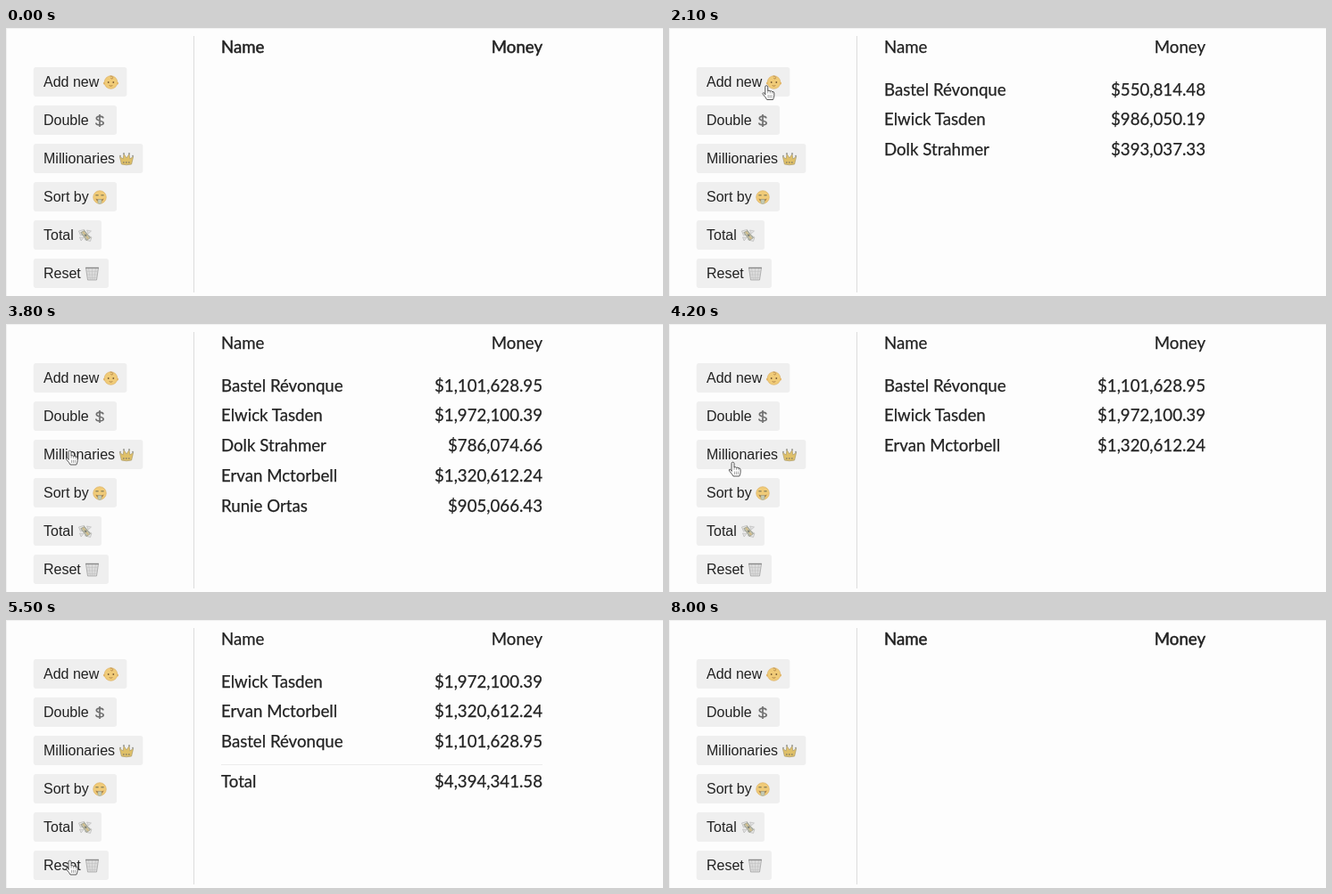
Animation, 736 px wide and 301 px high, one loop 9100 ms. Source, as an HTML page:

```html
<!DOCTYPE html>
<html lang="en">
<head>
<meta charset="utf-8">
<title>Money list</title>
<style>
html, body { margin: 0; width: 100%; height: 100%; overflow: hidden; background: #fdfdfd; }
svg { display: block; width: 736px; height: 301px; }
.btn text { font: 16px "Liberation Sans", Arial, sans-serif; fill: #222; }
.list text { font: 18.65px Lato, sans-serif; fill: #222; stroke: #222; stroke-width: .25; }
.list .strong { stroke-width: .5; }
.end { text-anchor: end; }
</style>
</head>
<body>
<svg viewBox="0 0 736 301">
  <rect width="736" height="301" fill="#fdfdfd"/>
  <path d="M0 .5H736M.5 0V301" stroke="#f1f1f1"/>
  <path d="M210.5 9V297" stroke="#dcdcdc"/>
  <g id="buttons"></g>
  <g class="list">
    <g id="head"><text x="241" y="27.7">Name</text><text class="end" x="601" y="27.7">Money</text></g>
    <g id="rows"></g>
  </g>
  <g id="cursor">
    <path id="arrow" d="M0 0V13L3 10.3L5 15L7.3 14L5.3 9.4H9.3Z" fill="#222" stroke="#fff" stroke-width=".8"/>
    <g id="hand" stroke="#444" stroke-width=".9" stroke-linejoin="round" stroke-linecap="round">
      <path fill="#fff" d="M-1.7 9.5V1.2Q-1.7-.3-.3-.3T1.2 1.2V5.5Q2.5 4.6 3.8 5.9Q5.2 5.2 6.2 6.5Q8 6 8.3 8V11Q8 13.5 7 15.5H.2Q-1 13-4 9.8Q-5.2 8-3.8 7.6Q-2.8 7.5-1.7 9.5Z"/>
      <path fill="none" stroke-width=".5" d="M1.2 5.5V8M3.8 6V8.2M6.2 6.6V8.4M1.6 10.5V13.2M3.6 10.5V13.2M5.6 10.5V13.2"/>
    </g>
  </g>
</svg>
<script>
const LOOP = 9100, STEP = 100;
const $ = id => document.getElementById(id);

// Icons are centred on their own origin.
const face = '<circle r="7.3" fill="#f0cb78" stroke="#d8ae62" stroke-width=".6"/>';
const icons = {
  baby: `<circle cx="-7" cy="1" r="1.6" fill="#e6b768"/><circle cx="7" cy="1" r="1.6" fill="#e6b768"/>${face}
    <path d="M-1-7Q3-7 2-4.4Q0-3 0-5" fill="none" stroke="#b98d4e" stroke-width=".9"/>
    <circle cx="-2.8" cy="0" r=".9" fill="#7a5c34"/><circle cx="2.8" cy="0" r=".9" fill="#7a5c34"/>
    <path d="M-1.8 3.6Q0 4.8 1.8 3.6" fill="none" stroke="#a87b42" stroke-width=".9"/>`,
  dollar: `<path d="M4-2.6C3.6-5.5-3.7-5.7-3.7-2.5S4.2-.2 4.2 2.7S-4 5.8-4.2 2.5M0-7V7" fill="none" stroke="#707070" stroke-width="1.7"/>`,
  crown: `<path d="M-5.6 6L-7.6-2.6L-3.8 0L-3-5.4L0-1L3-5.4L3.8 0L7.6-2.6L5.6 6Q0 7.6-5.6 6Z" fill="#dfc068" stroke="#a99a6c" stroke-width=".7"/>
    <g fill="#a3a39c"><circle cx="-7" cy="-3.2" r="1.1"/><circle cx="-3" cy="-5.8" r="1.1"/><circle cx="3" cy="-5.8" r="1.1"/><circle cx="7" cy="-3.2" r="1.1"/></g>
    <path d="M-4 4H4" stroke="#8d8265" stroke-width="1.3" stroke-dasharray="1.6 1.4"/>`,
  rich: `${face}<path d="M-4.6-2.2H-1.4M1.4-2.2H4.6" stroke="#94885c" stroke-width="1.5"/>
    <path d="M-4.6 1.4Q0 3.2 4.6 1.4Q3.8 5 0 5T-4.6 1.4Z" fill="#a9824c"/>
    <path d="M-2 2.4H2V6.8Q0 8.2-2 6.8Z" fill="#c5cab4" stroke="#98a088" stroke-width=".5"/>`,
  cash: `<path d="M-7-5L-1-6.6L1-2L-5 0ZM0 5L6 6.4L7.4 2L3 0Z" fill="#e9e9e6" stroke="#aaa" stroke-width=".6"/>
    <path d="M-4.8-3.2L-.6-5.4L6 2.6L1.8 5.4Z" fill="#bfc0ac" stroke="#8c8d7f" stroke-width=".7"/>
    <path d="M-2.2-4.2L3.8 3.8" stroke="#d9bd82" stroke-width="1.4"/><circle cx=".7" cy="-.2" r="1.4" fill="#85867a"/>
    <path d="M2-6L7-5L3.6-2ZM-6 2L-1.4 2.4L-4.4 6Z" fill="#e2e2e2" stroke="#aaa" stroke-width=".5"/>`,
  bin: `<path d="M-7-6.4L-5 7H5L7-6.4Z" fill="#dcdcdc" stroke="#999" stroke-width=".7"/>
    <path d="M-4-6L-2 7M0-6V7M4-6L2 7M-6.4-2.6H6.4M-5.8 1H5.8M-5.3 4.4H5.3" stroke="#bbb" stroke-width=".5"/>
    <path d="M-7.4-6.6H7.4" stroke="#888" stroke-width="1.3"/>`
};

const buttons = [
  ['Add new', 104.6, 117.5, 'baby'], ['Double', 93.2, 105, 'dollar'],
  ['Millionaries', 122.6, 135, 'crown'], ['Sort by', 93.2, 105, 'rich'],
  ['Total', 76.2, 88.5, 'cash'], ['Reset', 84.2, 96.5, 'bin']
].map(([label, w, ix, icon], i) => ({ label, w, ix, icon, x: 30.8, y: 44 + 43 * i, h: 33 }));

$('buttons').innerHTML = buttons.map(b => `<g class="btn">
  <rect x="${b.x}" y="${b.y}" width="${b.w}" height="${b.h}" rx="3" fill="#efefef"/>
  <text x="42" y="${b.y + 22}">${b.label}</text>
  <g transform="translate(${b.ix} ${b.y + 17})">${icons[b.icon]}</g></g>`).join('');

const people = [
  ['Bastel Révonque', 550814.477, 1100], ['Elwick Tasden', 986050.194, 1700],
  ['Dolk Strahmer', 393037.33, 2100], ['Ervan Mctorbell', 660306.12, 2600],
  ['Runie Ortas', 452533.214, 3000]
].map(([name, money, added]) => ({ name, money, added }));

const clicks = { double: 3300, filter: 4100, sort: 4500, total: 5100, reset: 5800 };

// time, x, y
const path = [
  [100, 385, 310], [700, 109.5, 65], [2900, 109.5, 65], [3000, 94, 79.5],
  [3100, 74.5, 106], [3500, 74.5, 106], [3800, 71.8, 142.5], [4100, 71.8, 142.5],
  [4400, 71.8, 192.5], [4600, 71.8, 192.5], [4900, 71.8, 234], [5200, 71.8, 234],
  [5500, 71.8, 270.5], [7400, 71.8, 270.5], [7900, 684, 280]
];
const SHOWN = 200, HIDDEN = 8000;

const format = n => '$' + n.toFixed(2).replace(/\B(?=(\d{3})+\.)/g, ',');

const line = (y, name, money) =>
  `<text x="241" y="${y}">${name}</text><text class="end" x="601" y="${y}">${format(money)}</text>`;

function listAt(t) {
  if (t >= clicks.reset) return '';
  let rows = people.filter(p => t >= p.added);
  if (t >= clicks.double) rows = rows.map(p => ({ ...p, money: p.money * 2 }));
  if (t >= clicks.filter) rows = rows.filter(p => p.money > 1e6);
  if (t >= clicks.sort) rows.sort((a, b) => b.money - a.money);
  let out = rows.map((p, i) => line(75.6 + 33.75 * i, p.name, p.money)).join('');
  if (t >= clicks.total) {
    const sum = rows.reduce((s, p) => s + p.money, 0);
    out += '<path d="M241 162.5H601" stroke="#ececec"/>' + line(187.7, 'Total', sum);
  }
  return out;
}

function pointAt(t) {
  const i = Math.max(1, path.findIndex(k => k[0] >= t));
  const [t0, x0, y0] = path[i - 1], [t1, x1, y1] = path[i];
  const u = (t - t0) / (t1 - t0), e = u * u * (3 - 2 * u);
  return [x0 + (x1 - x0) * e, y0 + (y1 - y0) * e];
}

const show = (el, on) => el.setAttribute('visibility', on ? 'visible' : 'hidden');

function draw(t) {
  $('rows').innerHTML = listAt(t);
  const on = t >= SHOWN && t < HIDDEN;
  for (const el of $('head').children) el.classList.toggle('strong', !on);
  const [x, y] = on ? pointAt(t) : [0, 0];
  const over = buttons.some(b => x >= b.x && x <= b.x + b.w && y >= b.y && y <= b.y + b.h);
  $('cursor').setAttribute('transform', `translate(${x} ${y})`);
  show($('arrow'), on && !over);
  show($('hand'), on && over);
}

const start = performance.now();
let last = -1;
function tick() {
  const t = Math.floor((performance.now() - start) % LOOP / STEP) * STEP;
  if (t !== last) draw(last = t);
  requestAnimationFrame(tick);
}
tick();
</script>
</body>
</html>
```
